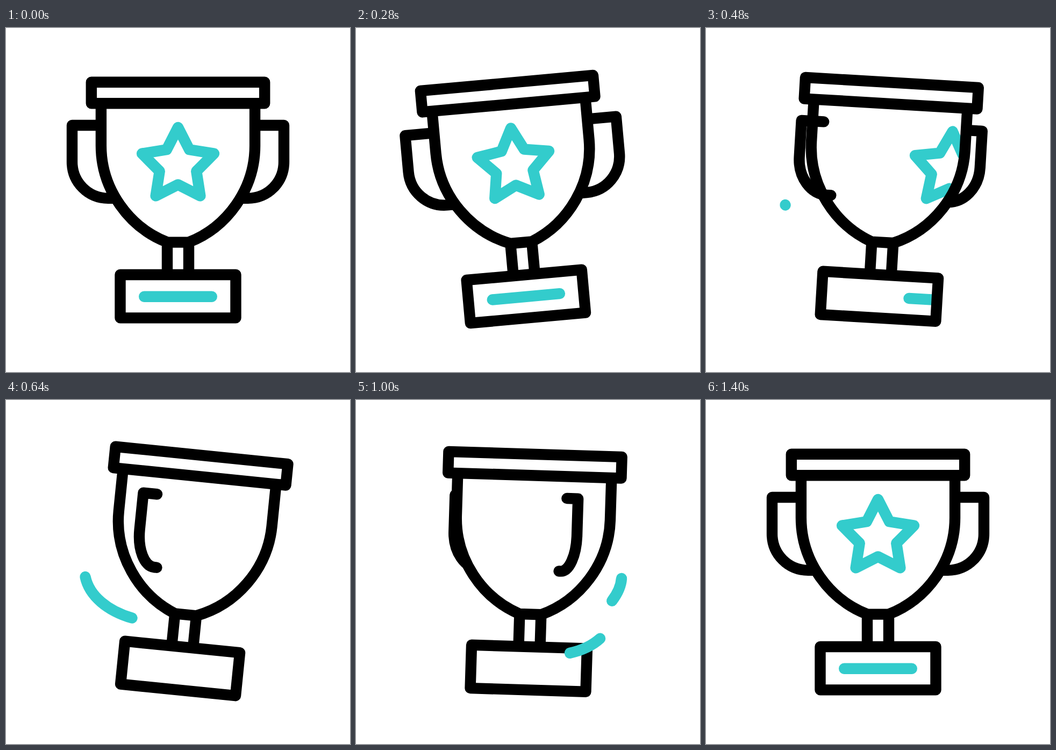
Recreate the animation shown at these times as an HTML page. Size 640 by 640 pixels, loop 1800 ms.

```html
<!DOCTYPE html>
<html lang="en">
<head>
<meta charset="utf-8">
<title>Trophy</title>
<style>
  html, body { margin: 0; width: 100%; height: 100%; overflow: hidden; background: #fff; }
  svg { display: block; width: 100vw; height: 100vh; }
  .line { fill: none; stroke: #000; stroke-width: 20.4; stroke-linecap: round; stroke-linejoin: round; }
  .teal { stroke: #33cccc; }
</style>
</head>
<body>
<svg viewBox="0 0 640 640">
  <defs>
    <path id="cup" d="M176.9 140V219C177 300 229 371 300 398.6H340C411 371 463 300 463.1 219V140"/>
    <rect id="base" x="212.5" y="459" width="215" height="80.4"/>
    <clipPath id="inCup"><use href="#cup"/></clipPath>
    <clipPath id="inBase"><use href="#base"/></clipPath>
  </defs>
  <g id="trophy">
    <path id="back" class="line"/>
    <use href="#cup" fill="#fff"/>
    <g clip-path="url(#inCup)"><path id="star" class="line teal"/></g>
    <path class="line" d="M300 399V459M340 399V459"/>
    <use href="#base" fill="#fff"/>
    <g clip-path="url(#inBase)"><path id="bar" class="line teal" d="M257.2 499.7H382.8"/></g>
    <use href="#cup" class="line"/>
    <use href="#base" class="line"/>
    <rect x="158.8" y="100.7" width="322.4" height="39.6" class="line" style="fill:#fff"/>
    <path id="front" class="line"/>
  </g>
  <path id="arc1" class="line teal" pathLength="1"
    d="M147.5 329C155 365 190 393 236 406C290 425 370 428 434 403C455 394 468 384 476 374C486 361 493 347 494 332"/>
  <path id="arc2" class="line teal" pathLength="1"
    d="M327 474C345 475.5 375 476 397 471C420 466 440 457 455 443Q463 436 469 428"/>
</svg>
<script>
const LOOP = 1800, STEP = 40, END = 1400, SPIN = 280;
const el = id => document.getElementById(id);
const clamp = (v, lo, hi) => Math.min(hi, Math.max(lo, v));

function ease(t, from, to) {
  const p = clamp((t - from) / (to - from), 0, 1);
  return p * p * (3 - 2 * p);
}

// Keys are [ms, value, slope per second].
function curve(keys, t) {
  if (t <= keys[0][0]) return keys[0][1];
  for (let i = 1; i < keys.length; i++) {
    const [t0, a, m0] = keys[i - 1], [t1, b, m1] = keys[i];
    if (t > t1) continue;
    const s = (t - t0) / (t1 - t0), h = (t1 - t0) / 1000, r = 1 - s;
    return a * r * r * (1 + 2 * s) + b * s * s * (3 - 2 * s) + h * s * r * (m0 * r - m1 * s);
  }
  return keys[keys.length - 1][1];
}

const TILT = [[0, 0, 0], [280, -5.17, 0], [480, 3.38, 29], [560, 5.13, 13], [700, 5.86, 0],
  [800, 5.56, -8], [1000, 1.77, -19], [1120, 0, 0]];
const BACK = [[280, 1, 0], [480, .878, -1.4], [1000, -.745, -1.6], [1120, -.897, -1.1], [1240, -1, 0]];

// k is the sideways scale: -1 far left, 1 far right.
function handle(k) {
  const x = v => (320 + v * k).toFixed(2);
  return `M${x(147)} 181H${x(197)}V249C${x(197)} 287 ${x(167)} 316.8 ${x(130)} 316.8H${x(121.5)}`;
}

function starPath() {
  const pts = [];
  for (let i = 0; i < 10; i++) {
    const r = i % 2 ? 36 : 70.4, a = i * Math.PI / 5;
    pts.push(`${(320 + r * Math.sin(a)).toFixed(2)} ${(255.4 - r * Math.cos(a)).toFixed(2)}`);
  }
  return `M${pts.join("L")}Z`;
}

// Leaves to the right, comes back from the left.
function slide(t) {
  const go = ms => 118 * Math.pow(Math.max(0, ms) / 200, 2.24);
  return t < (SPIN + END) / 2 ? go(t - SPIN) : -go(END - t);
}

function trim(path, tail, head) {
  const len = head - tail;
  path.style.visibility = len > 0 ? "visible" : "hidden";
  path.setAttribute("stroke-dasharray", `${Math.max(len, .0005)} 2`);
  path.setAttribute("stroke-dashoffset", -tail);
}

function draw(t) {
  el("trophy").setAttribute("transform", `rotate(${curve(TILT, t)} 320 540)`);
  el("front").setAttribute("d", handle(2 * ease(t, SPIN, END) - 1));
  el("back").setAttribute("d", handle(curve(BACK, t)));
  const move = `translate(${slide(t)} 0)`;
  el("star").setAttribute("transform", move);
  el("bar").setAttribute("transform", move);
  trim(el("arc1"), ease(t, 643, 1092), ease(t, 470, 950));
  trim(el("arc2"), ease(t, 795, 1230), ease(t, 667, 1102));
}

el("star").setAttribute("d", starPath());
const start = performance.now();
function tick() {
  const t = (performance.now() - start) % LOOP;
  draw(Math.min(END, Math.floor((t + .5) / STEP) * STEP));
  requestAnimationFrame(tick);
}
tick();
</script>
</body>
</html>
```
